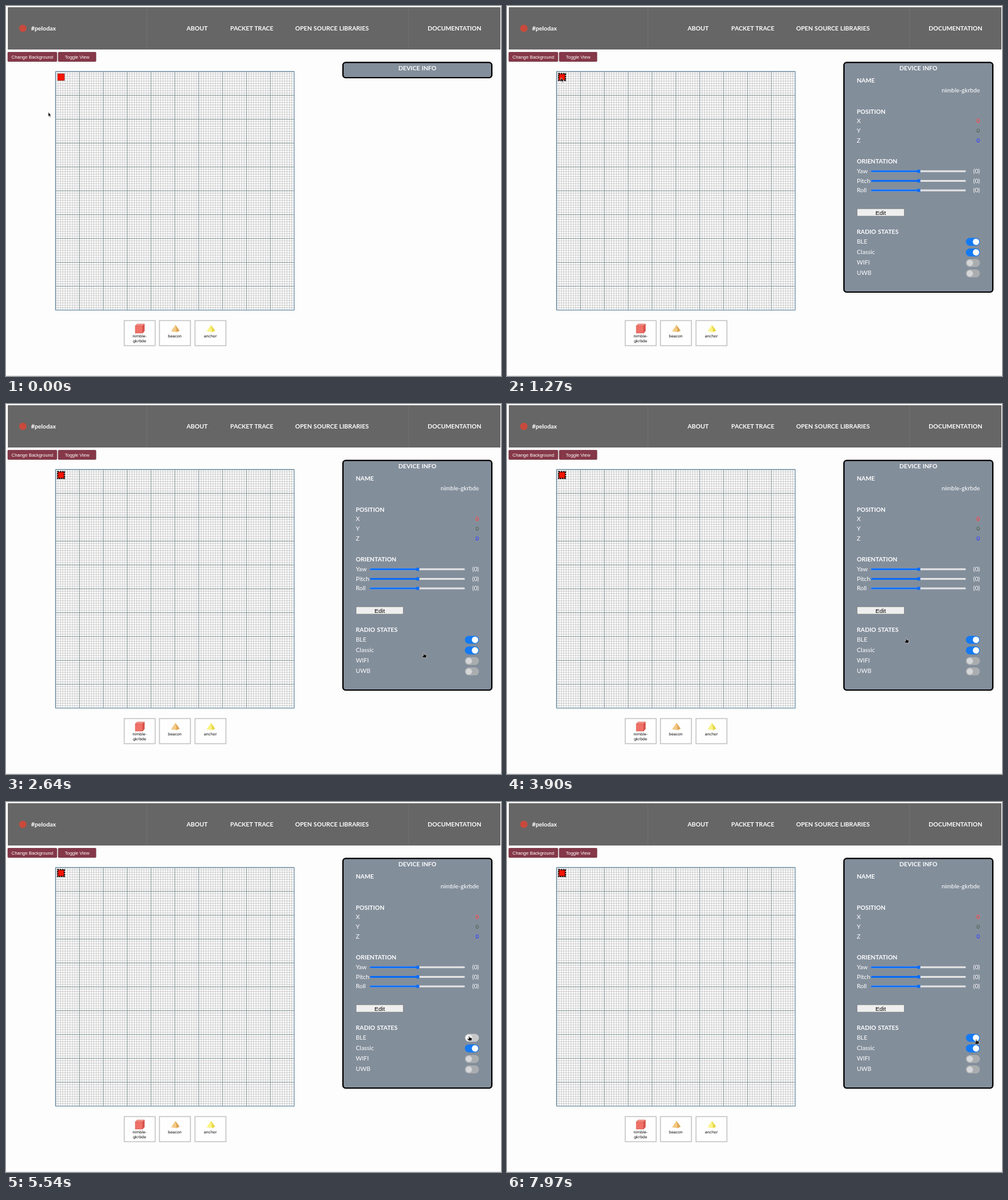
These frames come from a looping animation (808x604 px, 8000 ms). An HTML page:

```html
<!DOCTYPE html>
<html lang="en">
<head>
<meta charset="utf-8">
<title>Device simulator</title>
<style>
  html, body { margin: 0; width: 100%; height: 100%; overflow: hidden; background: #fdfdfd; }
  svg { display: block; width: 100%; height: 100%; }
  text { font: 9.85px Lato, sans-serif; fill: #fff; word-spacing: .5px; }
  .bold { font-weight: 700; }
  .button { font: 7.45px "Liberation Sans", Arial, sans-serif; word-spacing: 0; }
  .edit { font: 9.8px "Liberation Sans", Arial, sans-serif; fill: #000; }
  .card { font: 6.15px "DejaVu Sans", sans-serif; fill: #000; }
  .middle { text-anchor: middle; }
  .end { text-anchor: end; }
</style>
</head>
<body>
<svg id="stage" viewBox="0 0 808 604"></svg>
<script>
const stage = document.getElementById("stage");
const LOOP = 8000, PANEL_OPENS = 1000, BLE_OFF = 5300, BLE_ON = 7700, TOGGLE_TIME = 250;

const rect = (x, y, w, h, fill, extra = "") =>
  `<rect x="${x}" y="${y}" width="${w}" height="${h}" fill="${fill}" ${extra}/>`;
const circle = (x, y, r, fill, extra = "") =>
  `<circle cx="${x}" cy="${y}" r="${r}" fill="${fill}" ${extra}/>`;
const path = (d, fill, extra = "") => `<path d="${d}" fill="${fill}" ${extra}/>`;
// y is the middle of the capitals
const label = (x, y, text, cls = "", extra = "") =>
  `<text x="${x}" y="${y + 3.5}" class="${cls}" ${extra}>${text}</text>`;

function header() {
  return rect(3, 2, 804, 69, "#666") +
    rect(229.5, 2, 1, 69, "#707070") + rect(656.5, 2, 1, 69, "#707070") +
    circle(27.5, 36.5, 6, "#c94a3c") +
    label(41, 36, "#pelodax", "bold") +
    label(312, 36, "ABOUT", "bold middle") +
    label(401.3, 36, "PACKET TRACE", "bold middle") +
    label(532, 36, "OPEN SOURCE LIBRARIES", "bold middle") +
    label(732, 36, "DOCUMENTATION", "bold middle");
}

function pageButton(x, width, text) {
  return rect(x, 75.5, width, 15, "#853848", 'rx="1" stroke="#6d2b3a" stroke-width=".8"') +
    label(x + width / 2, 82.5, text, "button middle");
}

function grid() {
  const left = 81, top = 107, size = 389.4;
  const lines = count => {
    let d = "";
    for (let i = 0; i <= count; i++) {
      const p = i * size / count;
      d += `M${left + p} ${top}v${size}M${left} ${top + p}h${size}`;
    }
    return d;
  };
  return rect(left, top, size, size, "#fff") +
    path(lines(100), "none", 'stroke="#999" stroke-width=".45"') +
    path(lines(10), "none", 'stroke="#7c9292" stroke-width=".85"') +
    rect(left, top, size, size, "none", 'stroke="#6289a8" stroke-width=".9"');
}

function card(x, names, icon) {
  return rect(x, 513.5, 50.5, 41, "#fefefe", 'stroke="#c3c3c3" stroke-width="1.5"') + icon +
    names.map((name, i) => label(x + 25, 537.8 + i * 8, name, "card middle")).join("");
}

const pyramid = (x, light, dark) =>
  path(`M${x} 520.5l-7 10.5 9 1.5z`, light) + path(`M${x} 520.5l2 12 5-2.5z`, dark);

const cube = path("M211 522l3-3h12l-3 3z", "#f59488") +
  path("M211 522h12v12h-12z", "#ef7168") + path("M223 522l3-3v11.5l-3 3.5z", "#d9534c") +
  path("M211 522h12v12h-12zl3-3h12l-3 3M226 519v11.5l-3 3.5", "none", 'stroke="#c9473f" stroke-width=".5"');

function slider(y, name) {
  return label(571, y, name) + label(772, y, "(0)", "end") +
    rect(594, y - 1.3, 155, 3, "#e3e3e3", 'rx="1.5"') +
    rect(594, y - 1.3, 78, 3, "#0a6cf5", 'rx="1.5"') +
    circle(672, y + .2, 2.8, "#0a6cf5");
}

const coordinate = (y, axis, color) => label(571, y, axis) +
  label(772, y, "0", "bold end", `style="fill:${color};stroke:#ccd2d8;stroke-width:.25"`);

function toggle(y, name, isOn, id = "") {
  return label(571, y - 1, name) +
    rect(749, y - 6.5, 23, 13, isOn ? "#147af3" : "#aaadaf", `rx="6.5" id="${id}Track"`) +
    circle(isOn ? 765.6 : 755.5, y, 5.2, isOn ? "#fff" : "#d5d6d7", `id="${id}Knob"`);
}

function panelDetails() {
  return label(571, 121, "NAME", "bold") + label(772, 137, "nimble-gkrbde", "end") +
    label(571, 172, "POSITION", "bold") +
    coordinate(187.5, "X", "#f01818") + coordinate(203.5, "Y", "#24402c") + coordinate(219, "Z", "#0618f0") +
    label(571, 253.5, "ORIENTATION", "bold") +
    slider(269.5, "Yaw") + slider(285.2, "Pitch") + slider(300.8, "Roll") +
    rect(571.5, 331, 77, 12, "#efefef", 'stroke="#777" stroke-width=".7"') +
    label(610, 337, "Edit", "edit middle") +
    label(571, 368, "RADIO STATES", "bold") +
    toggle(385, "BLE", true, "ble") + toggle(402.2, "Classic", true, "classic") +
    toggle(419.4, "WIFI", false, "wifi") + toggle(436.6, "UWB", false, "uwb");
}

const outline = 'stroke="#fff" stroke-width=".6" stroke-linejoin="round"';

stage.innerHTML = header() +
  pageButton(3, 80, "Change Background") + pageButton(85.3, 61.5, "Toggle View") +
  grid() +
  rect(84.3, 110.5, 11, 11, "#f61400", 'id="device"') +
  card(193, ["nimble-", "gkrbde"], cube) +
  card(250.5, ["beacon"], pyramid(276.5, "#f3c983", "#dfa551")) +
  card(308.5, ["anchor"], pyramid(334.5, "#fbf385", "#e6d843")) +
  rect(0, 603, 808, 1, "#e4e4e4") +
  rect(550, 92.2, 243, 24.8, "#838e9b", 'id="panel" rx="4.5" stroke="#000" stroke-width="2.2"') +
  label(671.5, 101.5, "DEVICE INFO", "bold middle") +
  `<g id="details">${panelDetails()}</g>` +
  `<g id="cursor"><g id="arrow">${path("M0 0v7l1.6-1.4 1.2 2.6 1.2-.6-1.2-2.4h2.2z", "#000", outline)}</g>` +
  `<g id="hand">${path("M-.8 0q.8-.7 1.5 0v2.3l3.3.8q.7.3.6 1.2l-.7 3.4h-4.7l-2.5-3q.5-1.2 1.7-.2l.8.5z", "#000", outline)}</g></g>`;

const part = id => document.getElementById(id);
const set = (id, attributes) => {
  for (const name in attributes) part(id).setAttribute(name, attributes[name]);
};
const show = (id, visible) => set(id, { visibility: visible ? "visible" : "hidden" });
const clamp = v => Math.max(0, Math.min(1, v));
const ease = v => v * v * (3 - 2 * v);
const mix = (a, b, k) => a + (b - a) * k;

// time, x, y of the pointer tip
const route = [
  [0, 69, 173.5], [250, 69, 173.5], [850, 88, 117], [1450, 88, 117],
  [2350, 682, 406.5], [2750, 682, 406.5], [3550, 651.5, 382.5], [4250, 651.5, 382.5],
  [5050, 756, 382], [5750, 756, 382], [6500, 776.5, 395], [6950, 776.5, 395],
  [7550, 766, 387.5], [LOOP, 766, 387.5]
];

function pointer(t) {
  const i = route.findIndex(stop => stop[0] > t);
  const [t0, x0, y0] = route[i - 1], [t1, x1, y1] = route[i];
  const k = ease((t - t0) / (t1 - t0));
  return [mix(x0, x1, k), mix(y0, y1, k)];
}

function draw(t) {
  const open = t >= PANEL_OPENS;
  set("panel", { height: open ? 374.8 : 24.8 });
  show("details", open);
  set("device", {
    stroke: open ? "#000" : "#7d1008",
    "stroke-width": open ? 2 : .9,
    "stroke-dasharray": open ? "2.4 1.2" : "1.4 .8"
  });

  const off = ease(clamp((t - BLE_OFF) / TOGGLE_TIME)) - ease(clamp((t - BLE_ON) / TOGGLE_TIME));
  set("bleKnob", { cx: mix(765.6, 755.5, off) });
  set("bleTrack", { fill: `rgb(${mix(20, 200, off)},${mix(122, 200, off)},${mix(243, 202, off)})` });

  const [x, y] = pointer(t);
  const onPanel = x > 549 && x < 794 && y > 91 && y < 468;
  set("cursor", { transform: `translate(${x} ${y})` });
  show("arrow", !onPanel);
  show("hand", onPanel);
}

const start = performance.now();
function tick() {
  draw((performance.now() - start) % LOOP);
  requestAnimationFrame(tick);
}
tick();
</script>
</body>
</html>
```
